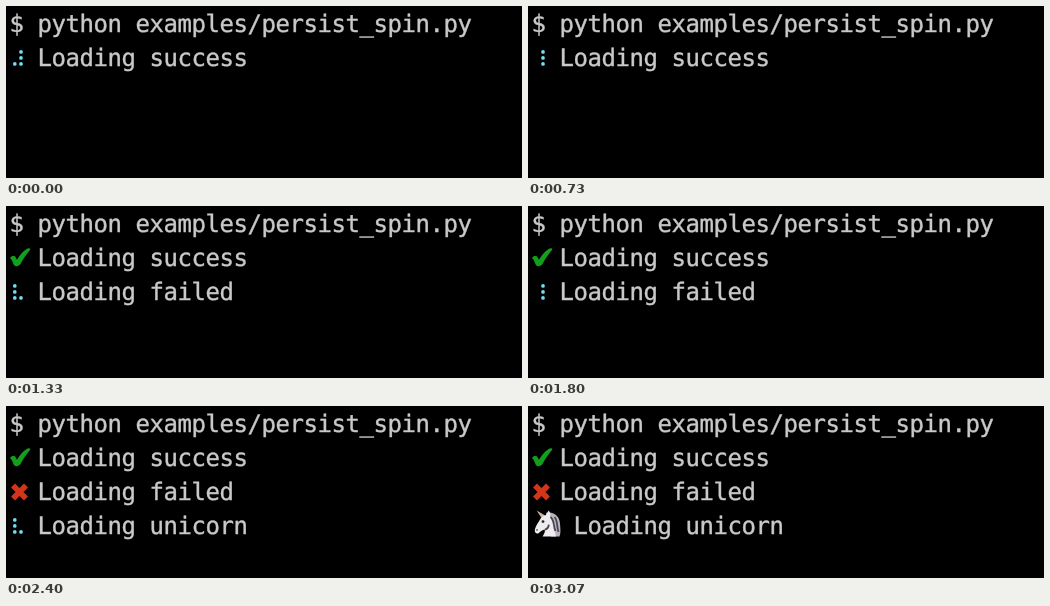
An HTML page that plays this animation: 516x172 px, repeating every 3.19 s.

```html
<!DOCTYPE html>
<html lang="en">
<head>
<meta charset="utf-8">
<title>Terminal spinner</title>
<style>
  html, body { margin: 0; width: 100%; height: 100%; overflow: hidden; background: #000; }
  svg { display: block; width: 516px; height: 172px; }
  text {
    font: 24px "DejaVu Sans Mono", "Noto Sans Mono", monospace;
    letter-spacing: -0.449px;
    text-rendering: geometricPrecision;
    fill: #c9c9c9;
    stroke: #c9c9c9;
    stroke-width: .4;
  }
  .tick { fill: #12a01c; }
  .cross { stroke: #d2351a; stroke-width: 5.6; }
  #dots { fill: #70def3; }
  #cursor { fill: #c7c7c7; }
</style>
</head>
<body>
<svg viewBox="0 0 516 172">
  <rect width="516" height="172"/>
  <g transform="translate(-.5 0)">
    <text x="4" y="26">$ python examples/persist_spin.py</text>
    <text x="32" y="60">Loading success</text>
    <text id="failed" x="32" y="94">Loading failed</text>
    <text id="unicorn" x="32" y="128">Loading unicorn</text>
  </g>

  <path id="tick" class="tick" d="M4 52C5.4 49.8 8.6 49.4 9.6 51.2L11 53.8C13.6 49 17 45 20.6 42.9C22.6 41.8 25.2 42.2 23.8 44.2C20.2 48.6 17.2 52.8 14.8 57.4C13 60.8 8.8 61 7.6 58.4C6.6 56 5.8 53.2 4 52Z"/>
  <path id="cross" class="cross" d="M7 79.5L20 92.5M20 79.5L7 92.5"/>

  <g id="head">
    <path fill="#c9b8a6" d="M8.6 104.5L17.2 109.4L14 112.4Z"/>
    <path fill="#b9b3bf" d="M18 107C26 105 32 111 32 118C32.4 123 33 127 31.5 130.5L23 130.5L20 115Z"/>
    <path fill="#eeecef" d="M20.6 104.6C22.4 106.6 22.6 108.6 22 110.4C26.4 114 27 119 26.6 124L28 130.5L14.6 130.5C16 128 17.4 126 16.8 123.4C14.6 123.8 12.8 125 10.8 127C8.8 128.4 6.4 126.8 6.8 123.8C7.6 120 9.8 117.4 11.6 114.2C13 111.2 15.4 109.6 18 109Z"/>
    <path fill="none" stroke="#4a4452" stroke-width="1.8" d="M22.5 111C27 115 25 120 27.5 125M26.5 111C30 115 28.5 120 30.5 126M17 123.6C19.4 122.8 20.6 121 20.8 118.6"/>
    <circle cx="15" cy="115.6" r="1.4" fill="#26222b"/>
    <circle cx="9" cy="124" r=".9" fill="#625c68"/>
  </g>

  <g id="dots"></g>
  <rect id="cursor" x="4" y="136" width="14" height="34"/>
</svg>
<script>
  const LOOP = 3190;
  const FAIL_AT = 12, UNICORN_AT = 29, DONE_AT = 44, CURSOR_OFF = 46;
  const GLYPHS = "⠋⠙⠹⠸⠼⠴⠦⠧⠇⠏";
  // Spinner glyph per screen refresh; a repeat is a held refresh.
  const SPIN = "455788900123" + "01234456779001233" + "012345678990122";

  const el = id => document.getElementById(id);
  const show = (id, on) => el(id).setAttribute("visibility", on ? "visible" : "hidden");

  const dots = Array.from({ length: 6 }, (_, i) => {
    const dot = document.createElementNS("http://www.w3.org/2000/svg", "circle");
    dot.setAttribute("cx", i < 3 ? 8.8 : 15);
    dot.setAttribute("cy", 45.9 + 6 * (i % 3));
    dot.setAttribute("r", 1.85);
    return el("dots").appendChild(dot);
  });

  // 15 refreshes per second, rounded to hundredths of a second.
  const tickAt = ms => Math.floor((Math.floor(ms / 10) * 10 + 4) * 0.015);

  function draw(ms) {
    const tick = tickAt(ms);
    const done = tick >= DONE_AT;
    const line = (tick >= FAIL_AT) + (tick >= UNICORN_AT);

    show("tick", line > 0);
    show("failed", line > 0);
    show("cross", line > 1);
    show("unicorn", line > 1);
    show("head", done);
    show("cursor", done && tick < CURSOR_OFF);
    el("unicorn").setAttribute("x", done ? 46 : 32);

    const bits = done ? 0 : GLYPHS.charCodeAt(+SPIN[tick]) & 63;
    el("dots").setAttribute("transform", `translate(0 ${line * 34})`);
    dots.forEach((dot, i) => dot.setAttribute("visibility", bits >> i & 1 ? "visible" : "hidden"));
  }

  const start = performance.now();
  function frame(now) {
    draw(Math.max(0, now - start) % LOOP);
    requestAnimationFrame(frame);
  }
  draw(0);
  requestAnimationFrame(frame);
</script>
</body>
</html>
```
